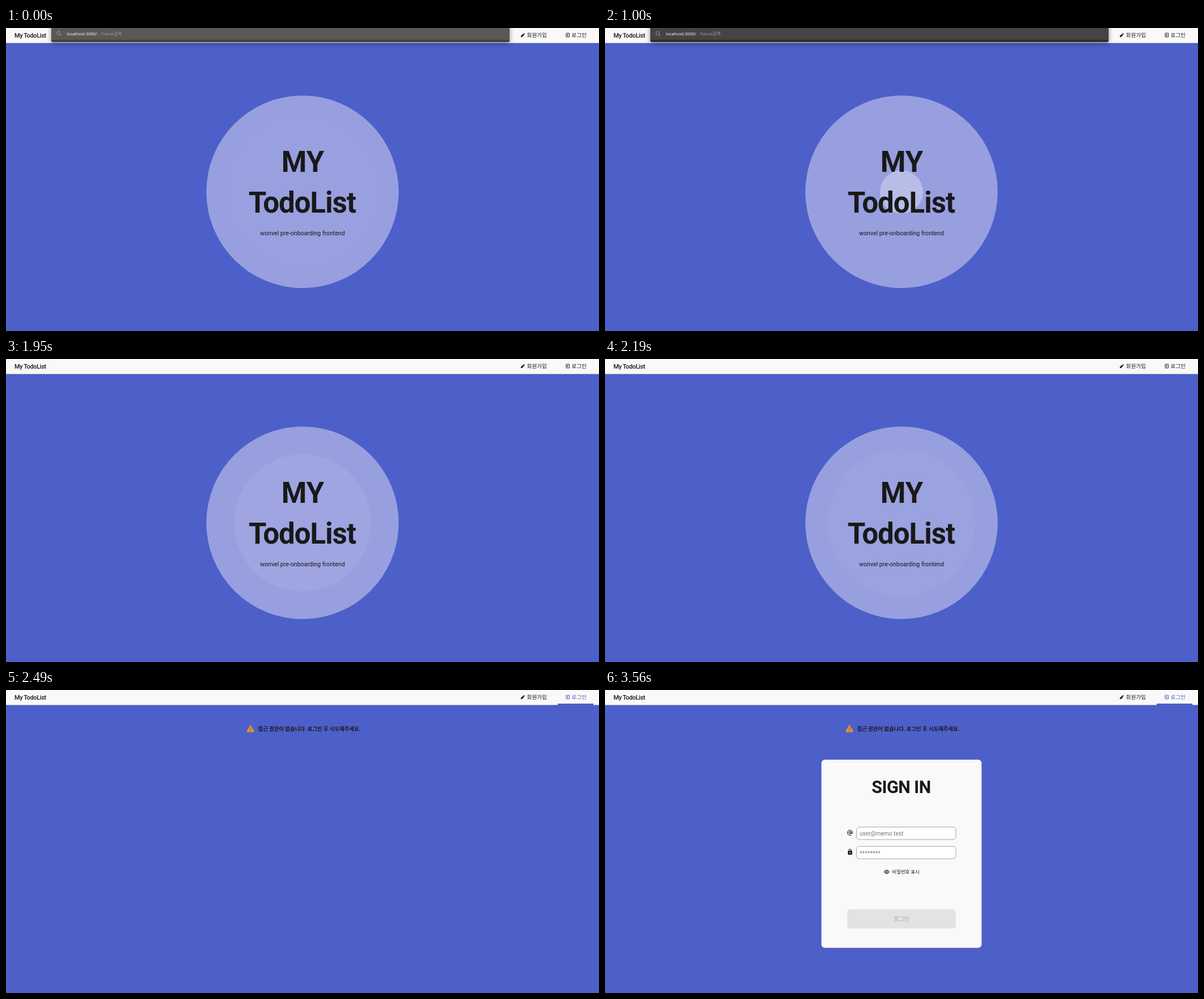
Write an HTML page that moves like this. It is 1048 px wide and 535 px high and loops after 4.43 s.

```html
<!DOCTYPE html>
<html lang="ko">
<head>
<meta charset="utf-8">
<title>My TodoList</title>
<style>
  html, body { margin: 0; width: 100%; height: 100%; overflow: hidden; background: #faf9f8; }
  svg { display: block; width: 100vw; height: 100vh; }
  text { font-family: Roboto, "Noto Sans CJK KR", "Noto Sans CJK", sans-serif; fill: #191919; }
  .mid { text-anchor: middle; }
  .nav { font-size: 9.6px; fill: #1c1b22; }
  .bold { font-weight: 700; }
  .field { fill: #fff; stroke: #a3a3a6; }
  .hint { font-size: 10.1px; fill: #757575; }
  .line { fill: none; stroke: #191919; stroke-width: 1.1; }
  #bar text { font: 7.5px "Open Sans", "Noto Sans CJK KR", sans-serif; fill: #fff; }
  #bar rect { filter: drop-shadow(0 2px 4px rgba(0, 0, 0, .45)); }
</style>
</head>
<body>
<svg viewBox="0 0 1048 535" preserveAspectRatio="none">
  <rect width="1048" height="535" fill="#faf9f8"/>
  <rect id="rule" y="26" width="1048" height="1" fill="#a5a4a7"/>
  <rect id="blue" y="26.5" width="1048" height="508.5" fill="#4d5fc9"/>

  <g id="home">
    <circle cx="524" cy="289.3" r="170" fill="#979fdf"/>
    <circle id="pulse" cx="524" cy="289.3" fill="#faf9f8"/>
    <g class="mid">
      <text class="bold" x="524.5" y="253.5" font-size="51">MY</text>
      <text class="bold" x="523.5" y="326" font-size="51" letter-spacing="-1">TodoList</text>
      <text x="524" y="365.5" font-size="10.6">wonvel pre-onboarding frontend</text>
    </g>
  </g>

  <g id="login">
    <path d="M432 63.2 L437.6 73.4 H426.4 Z" fill="#e0922a" stroke="#e0922a" stroke-width="2.4" stroke-linejoin="round"/>
    <path d="M432 65.8 V69.6 M432 71 V72.4" stroke="#4d5fc9" stroke-width="1.3"/>
    <text class="bold" x="445.5" y="72.3" font-size="9.4">접근 권한이 없습니다. 로그인 후 시도해주세요.</text>
    <g id="card">
      <rect x="382.5" y="123" width="283" height="332.2" rx="6" fill="#faf9f8"/>
      <text class="bold mid" x="523.5" y="182" font-size="30.5" letter-spacing="-.5">SIGN IN</text>
      <rect class="field" x="444.5" y="242" width="175.5" height="22" rx="5"/>
      <rect class="field" x="444.5" y="276" width="175.5" height="22" rx="5"/>
      <text class="hint" x="450" y="257">user@memo.test</text>
      <text class="hint" x="450" y="291.5" letter-spacing=".25">********</text>
      <g class="line">
        <circle cx="433" cy="252" r="1.9"/>
        <path d="M435 249.8 V252.6 A1.3 1.3 0 0 0 437.5 252.6 V252 A4.5 4.5 0 1 0 433 256.5 H435.4"/>
        <path d="M431 283.5 V283 A2 2 0 0 1 435 283 V284"/>
        <path d="M493.2 321 Q497.8 314.4 502.4 321 Q497.8 327.6 493.2 321 Z"/>
        <circle cx="497.8" cy="321" r="1.5"/>
      </g>
      <rect x="429.3" y="283.8" width="7.5" height="7" rx="1" fill="#191919"/>
      <circle cx="433" cy="287.3" r="1" fill="#faf9f8"/>
      <text x="507.5" y="324" font-size="8.4">비밀번호 표시</text>
      <rect x="428" y="387.3" width="192" height="33.6" rx="5" fill="#e4e3e2"/>
      <text class="mid" x="524" y="408" font-size="10" style="fill:#a5a5aa">로그인</text>
    </g>
  </g>

  <text x="15" y="16.7" font-size="11" font-weight="500" letter-spacing="-.36">My TodoList</text>
  <path d="M909.6 16.3 L910.1 13.7 L913.6 10.2 L915.8 12.3 L912.3 15.8 Z M914.2 9.6 L915.1 8.8 L917.2 10.8 L916.4 11.7 Z" fill="#191919"/>
  <text class="nav" x="920.6" y="16.2">회원가입</text>
  <g id="tab">
    <path d="M990 11 V9.2 H995.6 V15.8 H990 V14 M988.6 12.5 H993 M991.6 10.9 L993.2 12.5 L991.6 14.1" fill="none" stroke="currentColor"/>
    <text class="nav" x="999.6" y="16.2" style="fill:currentColor">로그인</text>
    <rect id="mark" x="975" y="24" width="63.3" height="3" fill="#4d5fc9"/>
  </g>

  <g id="bar">
    <rect id="base" x="80" y="-6" width="810" height="31" rx="3"/>
    <path id="top" d="M80 0 H890 V20.7 H80 Z"/>
    <path d="M82 25.3 H888" stroke="#a9a9ad" stroke-width=".7"/>
    <g fill="none" stroke="#a2a2a2" stroke-width=".9">
      <circle cx="93" cy="9.3" r="3"/><path d="M95.2 11.5 L98 14.3"/>
    </g>
    <text x="107.5" y="13.3"><tspan id="url"></tspan><tspan dx="2.6" fill="#a0a0a0">- Tobvel검색</tspan></text>
  </g>
</svg>
<script>
const LOOP = 4430;
const $ = id => document.getElementById(id);
const show = (id, on) => $(id).style.display = on ? '' : 'none';
const step = (t, from, size) => from + Math.floor((t - from) / size) * size;
const latest = (rows, t) => rows.filter(r => r[0] <= t).pop();

const typed = [[0, ''], [1150, 't'], [1350, 'to'], [1450, 'tod'], [1550, 'todo']];
const shades = [[0, '#5a5757', '#413f3f'], [50, '#444444', '#2d2d2d'], [1150, '#2b2b2b', '#2b2b2b']];
const radii = [[600, 2], [850, 20], [1100, 50], [1300, 75], [1600, 105], [1950, 121], [2190, 130]];

function radius(t) {
  if (t < 600) return 137;
  if (t >= 1600 && t < 1950) t = 1600;
  t = Math.min(t < 1950 ? step(t, 600, 50) : step(t, 1950, 60), 2190);
  const i = Math.max(1, radii.findIndex(r => r[0] >= t));
  const [t0, r0] = radii[i - 1], [t1, r1] = radii[i];
  return r0 + (r1 - r0) * (t - t0) / (t1 - t0);
}

function draw(t) {
  const home = t < 2390, login = t >= 2490, bar = t < 1950;
  show('home', home);
  show('login', login);
  show('blue', home || login);
  show('rule', !home && !login);
  show('mark', login);
  show('bar', bar);
  $('tab').style.color = login ? '#4d5fc9' : '#1c1b22';

  if (home) {
    const r = radius(t);
    $('pulse').setAttribute('r', r);
    $('pulse').setAttribute('opacity', 0.45 * (1 - r / 141));
  }
  if (bar) {
    const [, top, base] = latest(shades, t);
    $('top').setAttribute('fill', top);
    $('base').setAttribute('fill', base);
    $('url').textContent = 'localhost:3000/' + latest(typed, t)[1];
  }
  if (login) {
    const p = Math.min(1, (step(t, 2490, 30) - 2490) / 880);
    const rest = (1 - p) ** 5.3;
    $('card').setAttribute('opacity', 1 - rest);
    $('card').setAttribute('transform', `translate(0 ${-33 * rest})`);
  }
}

const start = performance.now();
function tick() {
  draw((performance.now() - start) % LOOP);
  requestAnimationFrame(tick);
}
tick();
</script>
</body>
</html>
```
